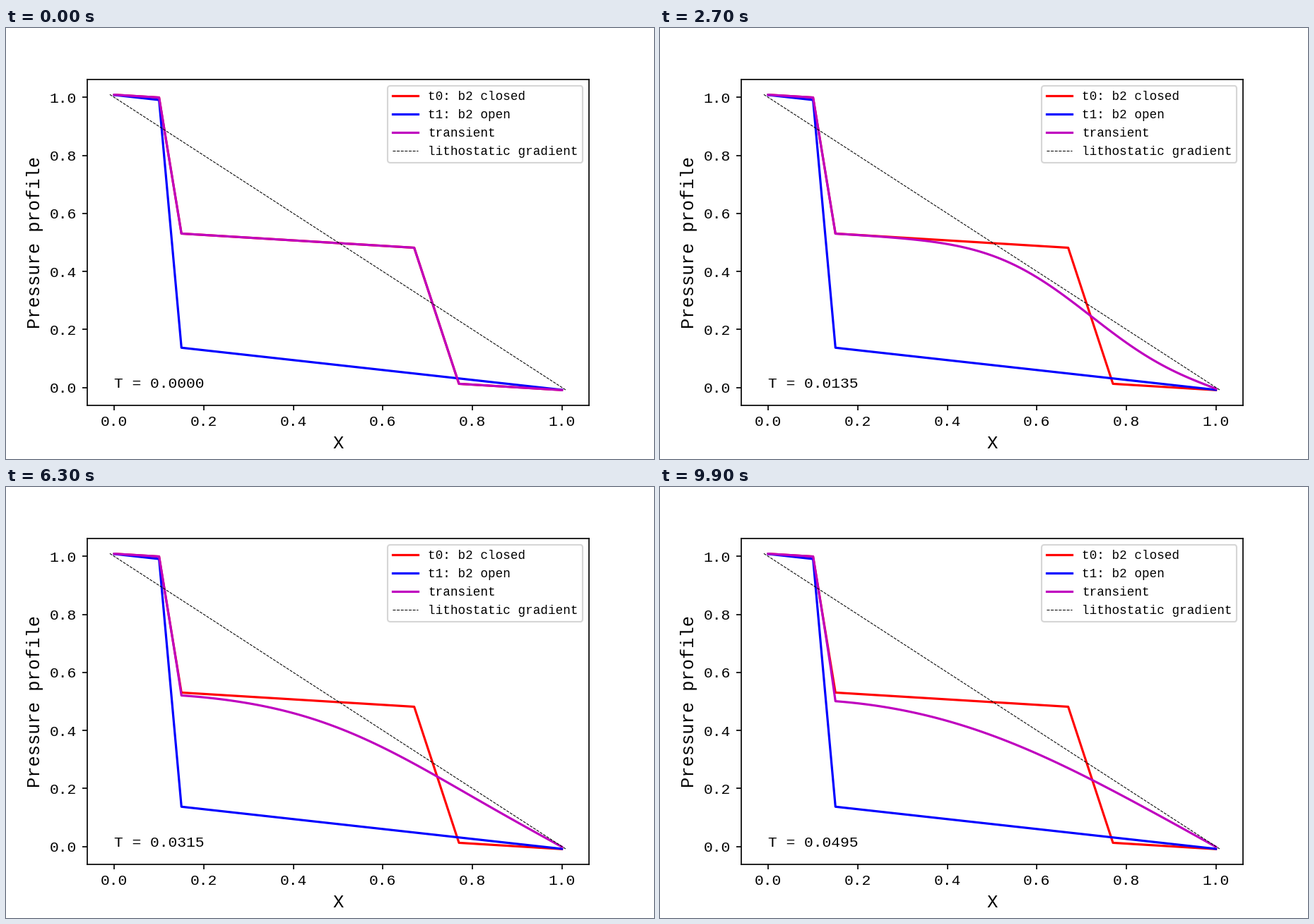
Write a matplotlib script that moves like this. It is 917x611 px and loops after 10 s.

```python
import numpy as np
import matplotlib.pyplot as plt
from matplotlib.animation import FuncAnimation

W, H = 917, 611
DPI = W / 6
FRAMES, INTERVAL = 100, 100
DT = 0.0005
DX = 0.01
P_LEFT, P_RIGHT = 1.01, -0.01

plt.rcParams.update({"font.family": "Liberation Mono", "font.size": 10})

x = np.linspace(0, 1, 101)
# Fixed pressures sit one cell beyond each end of x
ends = np.array([-DX, 1 + DX])
faces = np.linspace(-DX / 2, 1 + DX / 2, 102)


def permeability(b2_open):
    k = np.ones_like(faces)
    k[(faces > 0.10) & (faces < 0.15)] = 0.01
    if not b2_open:
        k[(faces > 0.67) & (faces < 0.77)] = 0.02
    return k


def steady(k):
    """Constant-flux profile between the two fixed ends."""
    resistance = np.cumsum(1 / k)
    return P_LEFT + (P_RIGHT - P_LEFT) * resistance[:-1] / resistance[-1]


k_open = permeability(True)
closed = steady(permeability(False))
opened = steady(k_open)

# Diffusion after b2 opens, decomposed into decaying modes
A = (np.diag(-k_open[:-1] - k_open[1:])
     + np.diag(k_open[1:-1], 1) + np.diag(k_open[1:-1], -1)) / DX**2
rates, modes = np.linalg.eigh(A)
weights = modes.T @ (closed - opened)


def pressure(t):
    return opened + modes @ (np.exp(rates * t) * weights)


fig, ax = plt.subplots(figsize=((W + 1e-4) / DPI, (H + 1e-4) / DPI), dpi=DPI)
fig.subplots_adjust(left=0.125, right=0.9, bottom=0.125, top=0.88)
ax.plot(x, closed, "r", lw=1.5, label="t0: b2 closed")
ax.plot(x, opened, "b", lw=1.5, label="t1: b2 open")
curve, = ax.plot(x, closed, "m", lw=1.5, label="transient")
ax.plot(ends, 1 - ends, "k--", lw=0.5, label="lithostatic gradient")
clock = ax.text(0, 0, "T = 0.0000")
ax.set_xlabel("X", fontsize=12)
ax.set_ylabel("Pressure profile", fontsize=12)
ax.legend(loc="upper right", fontsize="small")


def update(i):
    t = i * DT
    curve.set_ydata(pressure(t))
    clock.set_text(f"T = {t:.4f}")
    return curve, clock


anim = FuncAnimation(fig, update, frames=FRAMES, interval=INTERVAL,
                     repeat=True, repeat_delay=0, blit=False)
plt.show()
```
